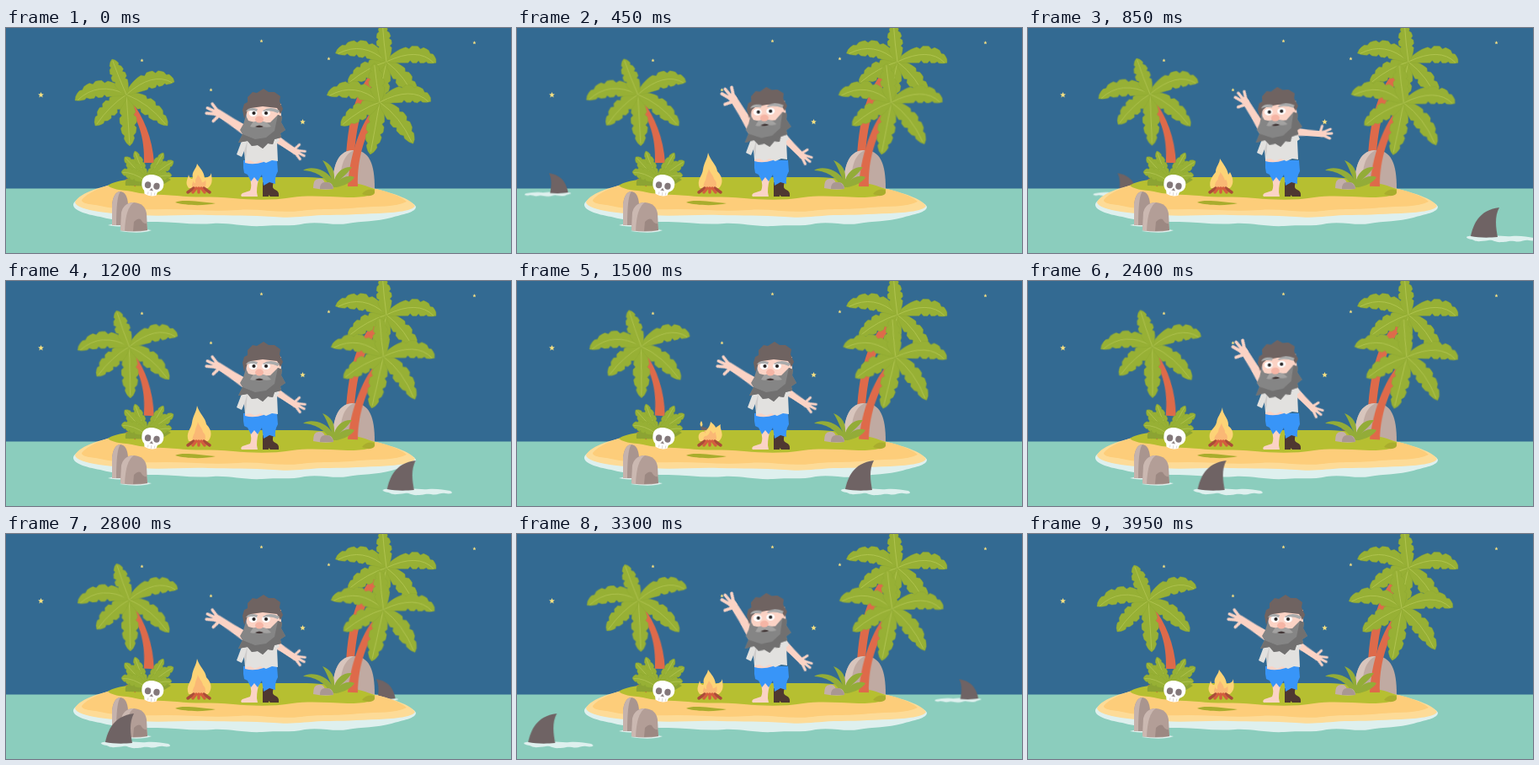
An HTML page that plays this animation: 600x267 px, repeating every 4 s.

```html
<!DOCTYPE html>
<html lang="en">
<head>
<meta charset="utf-8">
<title>Night island</title>
<style>
html, body { margin: 0; width: 100%; height: 100%; overflow: hidden; background: #336a92; }
svg { display: block; width: 100vw; height: 100vh; }

.skin { fill: #fbd3c5; }
.foam { fill: #def0ee; }
.trunk { fill: #de6a4a; }
.leaf { fill: #97b035; stroke: #8ca632; stroke-width: .4; }
.rib { fill: none; stroke: #b3c653; stroke-width: .8; }
.finger { fill: none; stroke: #fbd3c5; stroke-width: 3; stroke-linecap: round; }

.near { animation: near 4s linear infinite; }
.far { animation: far 4s linear infinite; }
@keyframes near { from { transform: translate(699px, 255px); } to { transform: translate(-138px, 255px); } }
@keyframes far {
  from { transform: translate(-13px, 200.5px) scale(-.67, .67); }
  to { transform: translate(671px, 200.5px) scale(-.67, .67); }
}

.sway { animation: sway 2s ease-in-out infinite alternate; }
.west { transform-origin: 170px 156px; }
.east { transform-origin: 412px 188px; }
@keyframes sway { from { transform: none; } to { transform: rotate(3.8deg); } }

/* The castaway switches between three held poses. */
.pose { animation: 1333.333ms step-end infinite; }
.armL { animation-name: armL; }
.armR { animation-name: armR; }
.head { animation-name: head; transform-origin: 303px 140px; }
.torso { animation-name: torso; }
.brows { animation-name: brows; }
@keyframes armL {
  0%, 83.333% { transform: translate(285px, 122px) rotate(212deg) scale(1.18); }
  33.333%, 66.667% { transform: translate(279px, 119px) rotate(237deg) scale(1.25); }
  50% { transform: translate(279px, 120px) rotate(237deg) scale(1.15); }
}
@keyframes armR {
  0%, 83.333% { transform: translate(316px, 128px) rotate(33deg); }
  33.333%, 66.667% { transform: translate(315px, 128px) rotate(44deg); }
  50% { transform: translate(316px, 123px) rotate(4deg); }
}
@keyframes head {
  0%, 83.333% { transform: none; }
  33.333% { transform: translate(-5px, -2px) rotate(-4deg); }
}
@keyframes torso {
  0%, 83.333% { transform: none; }
  33.333% { transform: translate(-2px, -2px); }
}
@keyframes brows {
  0%, 83.333% { transform: none; }
  33.333% { transform: translateY(-3px); }
}
</style>
</head>
<body>
<svg viewBox="0 0 600 267" preserveAspectRatio="none">
  <defs>
    <g id="crown"></g>
    <g id="shark">
      <path class="foam" d="M0 -7C6 -10 13 -6 20 -8C36 -10 45 -7 54 -8C64 -9 72 -7 80 -6C85 -3 80 -2 74 -3C68 -4 65 0 57 -2C49 -3 49 -1 42 -1C34 0 32 -4 26 -3C18 -2 12 -1 9 -3C7 -5 0 -4 0 -7Z"/>
      <path fill="#6f6364" d="M5 -8C8 -21 14 -39 39 -42C33 -31 35 -18 37 -7C27 -6 14 -6 5 -8Z"/>
    </g>
    <g id="arm">
      <path class="skin" d="M-2 -5L17 -3.500L31 -3Q38 -5 39 0Q38 5 31 4L16 4L-2 5Z"/>
      <path class="finger" d="M35 -2L43 -6M36 0L45 -1M35 2L43 5M31 -1L33 -9"/>
    </g>
  </defs>

  <rect width="600" height="267" fill="#336a92"/>
  <g id="stars" fill="#f6df81"></g>
  <rect y="190.500" width="600" height="77" fill="#8bcdbd"/>

  <g class="far"><use href="#shark"/></g>

  <!-- Rear palm and boulder -->
  <path class="trunk" d="M438 48C415 75 403 110 403 188L413 188C412 115 425 80 447 50Z"/>
  <use href="#crown" transform="translate(452 40) rotate(16)"/>
  <path fill="#c0aaa2" d="M388 190C388 160 396 145 413 145C431 145 438 160 438 190Z"/>
  <path fill="#d8c5bd" d="M388 190C388 160 396 145 413 145C401 151 397 163 397 190Z"/>

  <!-- Island -->
  <path class="foam" d="M80 209C83 200 110 194 130 192L440 196C466 201 485 206 487 212C487 219 471 221 458 225C440 230 423 229 406 232C389 235 374 229 355 232C338 236 322 233 304 235C282 236 266 231 246 232C222 234 201 230 180 230C152 230 129 229 112 224C94 221 79 216 80 209Z"/>
  <path fill="#fddb97" d="M82 207C85 198 107 189 135 184L430 189C459 195 481 203 486 211C484 217 463 219 443 220C417 221 398 222 377 222C354 223 342 226 318 224C291 222 266 223 241 222C211 221 187 224 160 222C130 221 84 217 82 207Z"/>
  <path fill="#fdcd7a" d="M90 204C96 196 113 188 135 183L430 189C452 193 470 200 476 206C462 213 443 211 420 213C390 216 373 214 350 217C323 220 301 214 276 216C244 218 218 215 190 215C158 216 126 215 112 211C102 209 90 209 90 204Z"/>
  <path fill="#b6bf31" d="M121 187C130 180 159 177 205 177L350 177C390 177 420 184 438 191C440 199 426 201 406 201C382 200 360 198 340 201C315 205 292 204 270 202C244 199 222 202 203 199C180 197 167 198 154 195C142 192 128 193 121 187Z"/>
  <path fill="#a9ad2d" d="M201 207C209 203 227 206 249 208C237 211 214 211 201 207Z"/>
  <path fill="#a9ad2d" d="M423 197C427 191 437 190 438 194C439 199 430 201 423 197Z"/>

  <!-- Western palm and bush -->
  <g class="sway west">
    <path class="trunk" d="M143 90C157 108 165 130 164 160L176 160C174 130 163 105 149 87Z"/>
    <use href="#crown" transform="translate(143 79)"/>
  </g>
  <path fill="none" stroke="#c9673f" stroke-width="1.5" d="M147 187l-4 -8M153 188l2 -9M186 186l4 -8"/>
  <path fill="#8ca333" d="M142 187C140 178 150 174 162 175C178 172 190 176 196 180L183 188Z"/>
  <g id="bush" transform="translate(167 182)"></g>

  <!-- Skull -->
  <g transform="rotate(8 174 187)">
    <path fill="#fff" d="M161 184C161 177 167 174 174 174C182 174 188 179 187 186C187 191 183 193 181 194L180 198Q173 201 166 198L165 194Q161 191 161 184Z"/>
    <ellipse cx="168.500" cy="187" rx="3.700" ry="4" fill="#83787a"/>
    <ellipse cx="179" cy="187" rx="3.700" ry="4" fill="#83787a"/>
    <path d="M173.500 190l2 3h-4ZM170 195v3M174 195v4M178 195v3" fill="#83787a" stroke="#b8afae" stroke-width=".5"/>
  </g>

  <!-- Campfire -->
  <path class="flame" fill="#fdd377"/>
  <path class="flame" fill="#fab875" transform="translate(229 190) scale(.55) translate(-229 -190)"/>
  <g fill="none" stroke-linecap="round" stroke-width="3.500">
    <path stroke="#a94c38" d="M216 195L223 190M242 195L235 190"/>
    <path stroke="#d35d3e" d="M222 195L226 190M229 195V190M236 195L232 190"/>
  </g>

  <!-- Eastern palm, plant and stones -->
  <g class="sway east">
    <path class="trunk" d="M436 96C418 120 408 155 406 188L418 188C417 155 426 125 444 99Z"/>
    <use href="#crown" transform="translate(444 88) rotate(14) scale(1.03)"/>
  </g>
  <path fill="#93ac38" d="M386 189C380 179 371 170 353 169C361 163 380 167 387 179C383 172 381 164 376 157C387 161 391 170 390 180C394 169 402 164 411 165C406 173 398 178 393 184C399 176 408 174 414 177C410 184 401 187 393 189Z"/>
  <path fill="#c4afaa" d="M365 190Q365 179 371 179Q377 178 379 184Q388 181 389 191Q378 193 365 190Z"/>
  <path fill="#a99792" d="M373 191Q373 183 379 183Q387 182 389 191Z"/>

  <!-- Castaway -->
  <path class="skin" d="M289 175H302Q298 184 298 195L299 200H280Q278 198 281 196L290 193Q293 187 289 175Z"/>
  <path fill="#4f3831" d="M305 183H318Q315 190 320 192Q325 194 324 200H314L312 198V200H305Z"/>
  <path fill="#3895f8" d="M282 157H322L323 170Q319 177 320 185L313 183L306 187L304 174L299 182L295 177L291 182L287 174L283 172L282 166Z"/>
  <g class="pose armL"><use href="#arm"/></g>
  <g class="pose armR"><use href="#arm"/></g>
  <g class="pose torso">
    <path class="skin" d="M284 148H306V159Q294 163 284 160Z"/>
    <path fill="#e2e1df" d="M286 118H318L325 134L322 136L323 158L316 157L309 160L302 157L296 160L290 157L284 158L283 146L280 153L274 150Z"/>
    <path fill="#cecccb" d="M283 146L287 133L285 155Z"/>
  </g>
  <g class="pose head">
    <path class="skin" d="M286 90H327V115H285Z"/>
    <path fill="#6f6361" d="M283 108L281 97L283 90L287 88L287 82L293 76L298 77L306 72L312 76L319 76L326 81L325 87L329 96L326 102L322 95L305 93L291 95L287 98Z"/>
    <path fill="#858585" d="M285 104L288 110L300 113L314 112L323 103L328 105L327 112L332 121L326 125L327 130L319 132L317 138L311 137L305 143L299 139L292 140L287 134L276 136L281 126L278 121L282 114Z"/>
    <path fill="#717070" d="M323 103L328 105L327 112L332 121L326 125L327 130L319 132L317 138L311 137L305 143L299 139L292 140L287 134L276 136L281 126L296 132L309 130L319 122Z"/>
    <ellipse cx="293.500" cy="101" rx="5" ry="4" fill="#fff"/>
    <ellipse cx="309" cy="101" rx="5" ry="4" fill="#fff"/>
    <circle cx="294.500" cy="101" r="2.100" fill="#272323"/>
    <circle cx="309" cy="101" r="2.100" fill="#272323"/>
    <path class="pose brows" fill="#a9abac" d="M285 99Q288 93 299 96L298 99Q292 97 285 99ZM305 98Q314 92 325 98L323 101Q315 97 306 99Z"/>
    <path fill="#a3a2a1" d="M290 117Q294 109 300 111Q308 109 315 117Q309 119 300 116Q295 119 290 117Z"/>
    <ellipse cx="301" cy="108.500" rx="5" ry="4" fill="#f5b5a5"/>
    <path fill="#403434" d="M296 117Q301 114 306 117Q301 119 296 117Z"/>
  </g>

  <!-- Shore rocks -->
  <path class="foam" d="M121 234Q133 230 146 234Q140 237 121 234ZM135 241Q154 236 173 240Q160 245 135 241Z"/>
  <path fill="#a9958f" d="M126 234V209Q128 194 136 194Q144 195 145 209V234Z"/>
  <path fill="#c6b3ac" d="M126 234V209Q128 194 136 194Q131 199 131 234Z"/>
  <path fill="#b39e97" d="M136 240L137 219Q140 207 152 207Q165 208 167 220L168 240Q152 243 136 240Z"/>
  <path fill="#cbb8b1" d="M136 240L137 219Q140 207 152 207Q142 213 141 241Z"/>
  <path fill="#9c8882" d="M151 241L152 230Q156 225 160 227Q163 233 167 232L168 240Z"/>

  <g class="near"><use href="#shark"/></g>
</svg>

<script>
const $ = s => document.querySelector(s);
const polygon = points => 'M' + points.map(p => p.map(v => v.toFixed(1)).join(' ')).join('L') + 'Z';

function star(x, y, r) {
  const points = Array.from({ length: 10 }, (_, i) => {
    const a = i * Math.PI / 5 - Math.PI / 2, d = i % 2 ? r * .45 : r;
    return [x + d * Math.cos(a), y + d * Math.sin(a)];
  });
  return `<path d="${polygon(points)}"/>`;
}

// A broad leaf around a curved midrib, with three notches on each side.
function leaf(x, y, lift, width) {
  const cx = x * .55, cy = y * .5 - lift;
  const at = (u, k) => {
    const v = 1 - u, dx = 2 * v * cx + 2 * u * (x - cx), dy = 2 * v * cy + 2 * u * (y - cy);
    const n = k / Math.hypot(dx, dy);
    return [2 * u * v * cx + u * u * x - dy * n, 2 * u * v * cy + u * u * y + dx * n];
  };
  const half = u => width * Math.pow(Math.sin(Math.PI * u), .6);
  const edge = side => {
    const points = [];
    for (let i = 1; i < 20; i++) {
      const u = i / 20;
      const notch = [8, 12, 16].includes(i) ? .72 : 1;
      points.push(at(u, side * half(u) * notch));
    }
    return points;
  };
  const d = polygon([[0, 0], ...edge(1), [x, y], ...edge(-1).reverse()]);
  return `<path class="leaf" d="${d}"/><path class="rib" d="M0 0Q${cx} ${cy} ${x * .95} ${y * .95}"/>`;
}

const fill = (id, make, items) => { $(id).innerHTML = items.map(a => make(...a)).join(''); };

fill('#stars', star, [
  [41.5, 79.5, 3.6], [161.5, 38.5, 2.2], [243.5, 73.5, 2.2], [303.5, 15.5, 2.2],
  [383.5, 36.5, 2.2], [352.5, 111.5, 3.4], [556.5, 17.5, 2.2]
]);

fill('#crown', leaf, [
  [4, 61, 0, 10], [-37, 37, 5, 10], [49, 37, 8, 10],
  [-61, 7, 20, 10], [57, -15, 20, 10], [-17, -42, 0, 9]
]);

fill('#bush', leaf, [
  [-14, -36, 0, 6], [-26, -29, 2, 7], [-30, -11, 6, 7],
  [20, -34, 0, 6], [32, -24, 4, 7], [30, -7, 5, 6]
]);

const flames = [
  'M217 190C212 183 216 180 217 174C218 179 221 180 222 178C220 170 226 168 227 161C231 167 235 170 236 178C240 177 243 176 244 172C244 178 247 184 240 190Z',
  'M217 190C214 180 221 174 223 171C223 164 228 161 228 155C234 164 237 168 238 174L240 171C245 180 244 186 240 190Z',
  'M217 190C213 182 219 178 222 179C226 177 229 173 230 167C235 171 236 173 236 174L242 170C240 176 248 182 240 190ZM219 166q3 5 0 7q-3 -3 0 -7Z',
  'M217 190C212 178 222 176 224 168C225 161 229 158 231 150C231 159 239 163 238 172C246 178 244 186 240 190Z',
  'M217 190C213 180 220 176 221 168C222 160 226 156 227 148C230 158 237 162 238 170C246 178 244 186 240 190Z'
];
const flicker = [0, 4, 2, 1, 3, 4, 2, 0, 3, 4, 1, 2, 3, 1, 4, 0, 0];
const frames = flicker.map(i => ({ d: `path("${flames[i]}")`, easing: 'steps(1, end)' }));
for (const el of document.querySelectorAll('.flame')) {
  el.setAttribute('d', flames[0]);
  el.animate(frames, { duration: 4000 / 3, iterations: Infinity });
}
</script>
</body>
</html>
```
